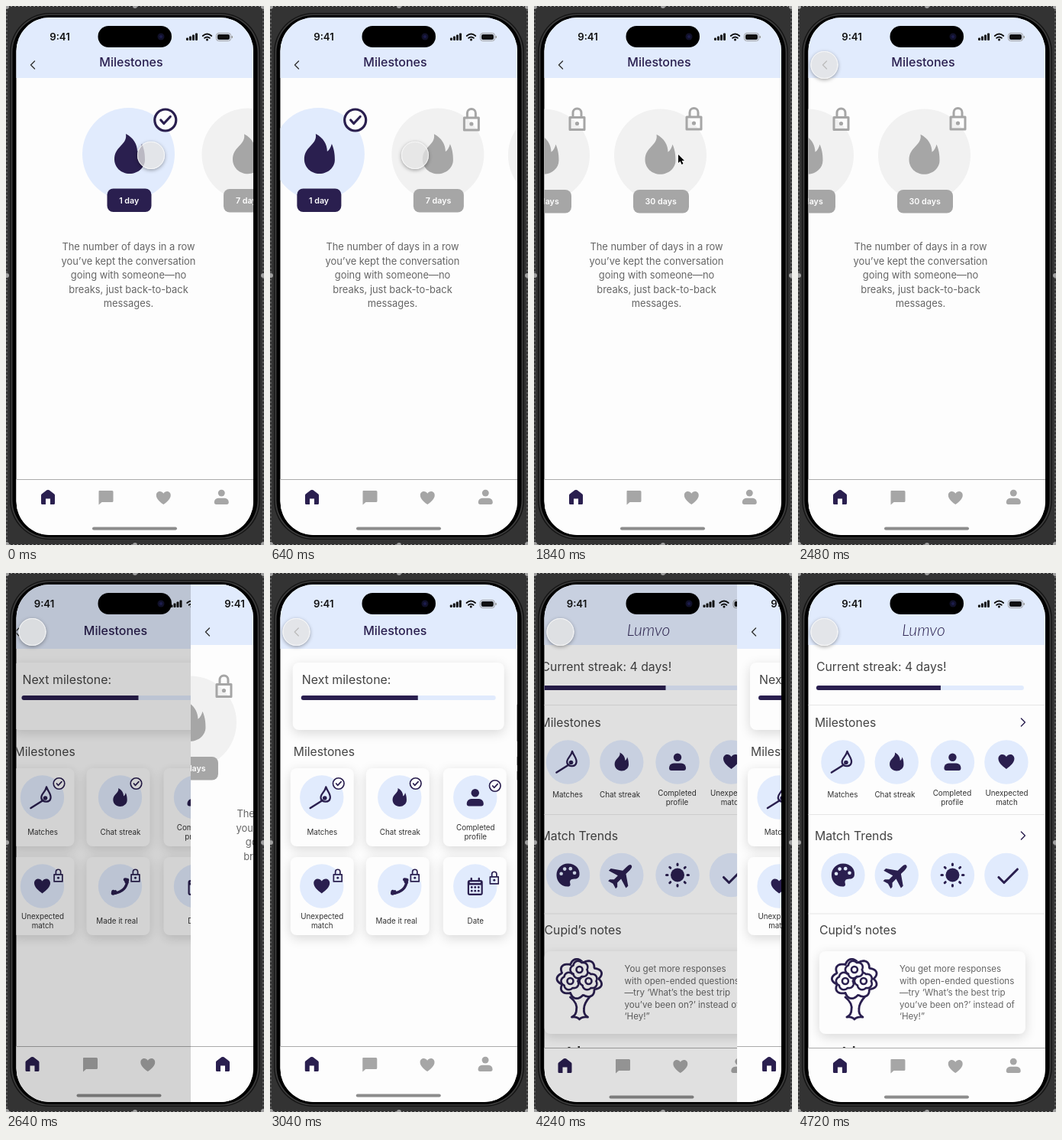
These frames come from a looping animation (338x704 px, 4.8 s). An HTML page with a canvas:

```html
<!DOCTYPE html>
<html lang="en">
<head>
<meta charset="utf-8">
<title>Milestones prototype</title>
<style>
html, body { margin: 0; width: 100%; height: 100%; overflow: hidden; background: #303030; }
canvas { display: block; width: 338px; height: 704px; }
</style>
</head>
<body>
<canvas id="stage"></canvas>
<script>
const W = 338, H = 704, LOOP = 4800, STEP = 80;
const NAVY = '#2a1f4f', BLUE = '#e1ebfd', GREY = '#a6a6a6', PALE = '#f1f1f1', PAPER = '#fdfdfd';
const SCREEN = { x: 13.5, y: 15, w: 310.5, h: 676, r: 44 };
const canvas = document.getElementById('stage');
const ratio = window.devicePixelRatio || 1;
canvas.width = W * ratio;
canvas.height = H * ratio;
const c = canvas.getContext('2d');
c.lineCap = c.lineJoin = 'round';

// ---------- helpers ----------
const clamp = v => Math.max(0, Math.min(1, v));
const smooth = v => { v = clamp(v); return v * v * (3 - 2 * v); };

function at(x, y, scale, draw) {
  c.save();
  c.translate(x, y);
  c.scale(scale, scale);
  draw();
  c.restore();
}
function rect(x, y, w, h, color) {
  c.fillStyle = color;
  c.fillRect(x, y, w, h);
}
function box(x, y, w, h, r, color) {
  c.fillStyle = color;
  c.beginPath();
  c.roundRect(x, y, w, h, r);
  c.fill();
}
function disc(x, y, r, color) {
  c.fillStyle = color;
  c.beginPath();
  c.arc(x, y, r, 0, 7);
  c.fill();
}
function shape(d, color) {
  c.fillStyle = color;
  c.fill(new Path2D(d));
}
function line(d, color, width) {
  c.strokeStyle = color;
  c.lineWidth = width;
  c.stroke(new Path2D(d));
}
function text(s, x, y, size, color, align = 'left', weight = 400) {
  c.font = `${weight} ${size}px Inter, "Open Sans", sans-serif`;
  c.fillStyle = color;
  c.textAlign = align;
  c.fillText(s, x, y);
}
function lines(list, x, y, gap, size, color, align) {
  list.forEach((s, i) => text(s, x, y + i * gap, size, color, align));
}
function panel(x, y, w, h) {
  c.save();
  c.shadowColor = 'rgba(0,0,0,.15)';
  c.shadowBlur = 15 * ratio;
  c.shadowOffsetY = 4 * ratio;
  box(x, y, w, h, 8, PAPER);
  c.restore();
}
function progress(x, y, w, done) {
  box(x, y, w, 6, 3, BLUE);
  box(x, y, done, 6, [3, 0, 0, 3], NAVY);
}

// ---------- icons, each centred on the origin ----------
const flame = color => shape('M-5-26C5-21 10-12 10-3C13-5 15-9 16-13C20-4 20 4 20 8C20 18 11 26 0 26' +
  'C-11 26-20 18-20 7C-20 0-17-5-12-10C-6-16-4-20-5-26Z', color);
const heart = color => shape('M0 9.5C-6 5-10.5 1-10.5-4C-10.5-10-3-11.5 0-6.5C3-11.5 10.5-10 10.5-4C10.5 1 6 5 0 9.5Z', color);

function person(color) {
  disc(0, -5.7, 5.2, color);
  box(-11, 2, 22, 9.5, [6, 6, 3, 3], color);
}
function home(color) {
  shape('M-9-2.5Q-9-3.5-8-4.2L-1.5-9.2Q0-10 1.5-9.2L8-4.2Q9-3.5 9-2.5V8Q9 9.5 7.5 9.5H3V2H-3V9.5H-7.5Q-9 9.5-9 8Z', color);
}
function chat(color) {
  shape('M-9-9H8Q9.5-9 9.5-7.5V4.5Q9.5 6 8 6H-5.5L-9.5 9.5V-7.5Q-9.5-9-9-9Z', color);
}
function match() {
  line('M-15 14L1 4', NAVY, 2.6);
  line('M5.5-13.5C8-7 12-4 11 1C10 7 1 7-1 2C-3-4 4-6 5.5-13.5Z', NAVY, 2.3);
  disc(4, 1, 2.8, NAVY);
}
function phone() {
  line('M9.5-7Q8 7-8 9.5', NAVY, 3.4);
  line('M6.5-8.5L9.5-8M-9 7L-9.5 9.5M8-6L9-5M-6.5 7.5L-6 8.5', NAVY, 4.6);
}
function calendar() {
  box(-10, -8, 20, 20, 3, NAVY);
  rect(-7.8, -1.5, 15.6, 11.2, BLUE);
  rect(-7, -5.6, 14, 1.6, BLUE);
  line('M-5-10V-7M5-10V-7', NAVY, 2.4);
  for (let i = 0; i < 6; i++) disc((i % 3 - 1) * 4.5, i < 3 ? 1.5 : 6.2, 1.4, NAVY);
}
function palette() {
  shape('M0-15C10-15 16-8 15 0C14 7 7 4 4 6C0 9 6 13 1 15C-9 16-15 8-15 0C-15-8-9-15 0-15Z', NAVY);
  for (let i = 0; i < 4; i++) {
    const a = Math.PI * (1.06 + i * 0.28);
    disc(9 * Math.cos(a), 9 * Math.sin(a), 2.3, BLUE);
  }
}
function plane() {
  c.rotate(Math.PI / 4);
  shape('M0-18Q3-18 3-12V-5L16 4V8L3 4V11L7 15V18L0 16L-7 18V15L-3 11V4L-16 8V4L-3-5V-12Q-3-18 0-18Z', NAVY);
}
function sun() {
  disc(0, 0, 9, NAVY);
  for (let i = 0; i < 8; i++) {
    c.rotate(Math.PI / 4);
    line('M0-13V-14.5', NAVY, 3);
  }
}
const tick = () => line('M-10 3L-3 10L14.5-7.5', NAVY, 3.1);

function checkBadge() {
  disc(0, 0, 14, PAPER);
  c.strokeStyle = NAVY;
  c.lineWidth = 3.2;
  c.stroke();
  line('M-6 0L-2 4.5L6.5-4.5', NAVY, 3.2);
}
function lock(color) {
  line('M-9.5-3H9.5V13H-9.5ZM-5.5-3V-9A5.5 5.5 0 0 1 5.5-9V-3', color, 3);
  disc(0, 5, 2.6, color);
}
function chevron(x, y, dir, size, color) {
  line(`M${x - dir * size / 2} ${y - size}L${x + dir * size / 2} ${y}L${x - dir * size / 2} ${y + size}`, color, 1.4);
}
function scallop(x, y, rx, ry, lobes, width) {
  c.beginPath();
  for (let i = 0; i <= 120; i++) {
    const a = i / 120 * Math.PI * 2;
    const k = 0.82 + 0.18 * Math.abs(Math.sin(a * lobes / 2));
    c.lineTo(x + rx * k * Math.cos(a), y + ry * k * Math.sin(a));
  }
  c.strokeStyle = NAVY;
  c.lineWidth = width;
  c.stroke();
}
function bouquet() {
  scallop(74.5, 530, 30, 26, 9, 2.8);
  [[62, 533], [86, 533], [74, 518]].forEach(([x, y]) => {
    disc(x, y, 11, PAPER);
    scallop(x, y, 12, 11.5, 5, 2.6);
    c.beginPath();
    c.arc(x, y, 4, 0, 7);
    c.stroke();
  });
  line('M62 554Q72 562 70 571Q70 577 64 580Q71 579 74 583Q77 579 85 580Q79 577 80 569Q80 562 88 553', NAVY, 2.8);
}

// ---------- shared interface ----------
function statusBar() {
  text('9:41', 70.5, 45, 13.2, '#111', 'center', 600);
  for (let i = 0; i < 4; i++) box(236 + i * 4, 41.5 - i * 2, 3, 3.5 + i * 2, 1, '#111');
  line('M257.8 39Q263.5 33.8 269.2 39M260.2 41.8Q263.5 39 266.8 41.8', '#111', 1.9);
  disc(263.5, 44, 1.5, '#111');
  c.strokeStyle = '#999';
  c.lineWidth = 1;
  c.beginPath();
  c.roundRect(275.5, 35.5, 19, 10, 3);
  c.stroke();
  box(277, 37, 16, 7, 2, '#111');
  rect(295.6, 39, 1.4, 3, '#999');
}
function header(bottom) {
  rect(13, 15, 311, 676, PAPER);
  rect(13, 15, 311, bottom - 15, BLUE);
  statusBar();
}
function navBar(dy) {
  rect(13, 618 + dy, 311, 73, PAPER);
  rect(13, 618 + dy, 311, 1, '#aaa');
  at(55, 641.5 + dy, 1, () => home(NAVY));
  at(131, 642 + dy, 1, () => chat(GREY));
  at(206.3, 642.5 + dy, 0.9, () => heart(GREY));
  at(282.3, 641 + dy, 0.86, () => person(GREY));
  box(113, 680.5 + dy, 111, 4, 2, '#8c8c8c');
}

// ---------- pages ----------
const STREAKS = [
  { x: 160.5, label: '1 day', w: 58, dy: 0 },
  { x: 317, label: '7 days', w: 66, dy: 0.5 },
  { x: 469.5, label: '14 days', w: 71, dy: 1.5 },
  { x: 622.5, label: '30 days', w: 73, dy: 1.5 }
];

function streakPage(scroll) {
  header(94);
  text('Milestones', 164, 79, 16, NAVY, 'center', 500);
  chevron(35, 77, -1, 5, '#333');
  STREAKS.forEach((s, i) => {
    const x = s.x - scroll, color = i ? GREY : NAVY;
    disc(x, 193.5 + s.dy, 60.5, i ? PALE : BLUE);
    at(x + (i ? 0 : 1.5), 193 + s.dy / 2, 1, () => flame(color));
    at(x + (i ? 44 : 48.3), i ? 149.5 - i * 0.5 : 149, 1, i ? () => lock(GREY) : checkBadge);
    box(x - s.w / 2 + 1, 238.5 + s.dy, s.w, 30.5, 8, color);
    text(s.label, x + 0.7, 257.8 + s.dy, 10.7, '#fff', 'center', 600);
  });
  lines(['The number of days in a row', 'you’ve kept the conversation', 'going with someone—no',
    'breaks, just back-to-back', 'messages.'], 160.5, 319, 18.6, 12.9, '#666', 'center');
  navBar(0);
}

const GOALS = [
  { label: ['Matches'], icon: match },
  { label: ['Chat streak'], icon: () => at(0, 0, 0.46, () => flame(NAVY)) },
  { label: ['Completed', 'profile'], icon: () => person(NAVY) },
  { label: ['Unexpected', 'match'], icon: () => heart(NAVY) },
  { label: ['Made it real'], icon: phone },
  { label: ['Date'], icon: calendar }
];

function goalLabel(goal, x, y) {
  const double = goal.label.length > 1;
  lines(goal.label, x, y - (double ? 6 : 0), 12, 9.8, '#333', 'center');
}

function milestonesPage() {
  header(99);
  text('Milestones', 164, 81, 16, NAVY, 'center', 500);
  chevron(35, 77, -1, 5, '#333');
  panel(30, 117, 277, 88);
  text('Next milestone:', 42, 145, 15.9, '#444');
  progress(41, 160, 255, 153);
  text('Milestones', 31, 239, 15.7, '#444');
  GOALS.forEach((goal, i) => {
    const col = i % 3, row = Math.floor(i / 3);
    const x = [68, 170, 269][col], y = 293 + row * 116;
    panel([27, 126, 227][col], 255 + row * 116, 83, 102);
    disc(x, y, 28.7, BLUE);
    at(x, y, 1, goal.icon);
    const bx = x + [22, 21, 26][col] - row, by = y + (col === 2 ? 3 : 0);
    if (row) at(bx, by - 13.5, 0.57, () => lock(NAVY));
    else at(bx, by - 18, 0.52, checkBadge);
    goalLabel(goal, i === 4 ? 166 : x + 0.5, y + 49);
  });
  navBar(0);
}

function homePage() {
  header(94);
  c.font = 'italic 300 21px Lato, cursive';
  c.fillStyle = NAVY;
  c.textAlign = 'center';
  c.fillText('Lumvo', 164.5, 82);
  text('Current streak: 4 days!', 24, 128, 15.8, '#444');
  progress(24, 147, 272, 163);
  text('Milestones', 22, 201, 15.7, '#444');
  text('Match Trends', 22, 348.5, 15.8, '#444');
  text('Cupid’s notes', 28, 472, 15.8, '#444');
  [172, 315, 444.5].forEach(y => rect(13, y, 311, 1, '#e6e6e6'));
  chevron(295, 195, 1, 5, NAVY);
  chevron(295, 343, 1, 5, NAVY);
  const trends = [palette, plane, sun, tick];
  [59, 129.3, 202.5, 273].forEach((x, i) => {
    disc(x, 247, 28.7, BLUE);
    at(x, 246.5, 1, GOALS[i].icon);
    goalLabel(GOALS[i], i === 1 ? 127 : x - 0.5 + (i === 3 ? 1 : 0), 296.7 - (i < 2 ? 3.7 : 0));
    disc(x, 394.5, 28.7, BLUE);
    at(x, 394.5, 1, trends[i]);
  });
  panel(28, 494, 270, 108);
  bouquet();
  lines(['You get more responses', 'with open-ended questions', '—try ‘What’s the best trip',
    'you’ve been on?’ instead of', '‘Hey!”'], 133, 521.3, 15.4, 11.6, '#666');
  rect(59, 619, 3, 2, '#333');
  rect(72, 618, 2.5, 2, '#333');
  navBar(2);
}

// ---------- phone and pointer ----------
function device() {
  rect(0, 0, W, H, '#333');
  box(5, 9, 328, 688, 52, '#151515');
  box(6.5, 10.5, 325, 685, 50.5, '#3c3c3c');
  box(8.5, 12, 321, 682, 48.5, '#000');
  c.save();
  c.setLineDash([2, 3]);
  c.lineCap = 'butt';
  c.lineWidth = 1;
  c.strokeStyle = '#999';
  c.strokeRect(1, 0.5, 336, 703);
  c.restore();
  [[1, 1], [169, 0], [337, 1], [1, 352], [337, 352], [1, 703], [169, 704], [337, 703]]
    .forEach(([x, y]) => disc(x, y, 3, '#a0a0a0'));
}
function island() {
  box(120.5, 26, 96.5, 28, 14, '#000');
  disc(203, 40, 4.5, '#11112a');
  disc(203, 40, 2, '#1d1d4c');
}
function touch(x, y, alpha) {
  c.save();
  c.globalAlpha = alpha;
  // The shadow stays outside the see-through disc.
  c.save();
  c.beginPath();
  c.rect(0, 0, W, H);
  c.arc(x, y, 18, 0, 7);
  c.clip('evenodd');
  c.shadowColor = 'rgba(0,0,0,.35)';
  c.shadowBlur = 5 * ratio;
  c.shadowOffsetY = 1.5 * ratio;
  disc(x, y, 18, '#fff');
  c.restore();
  disc(x, y, 18, 'rgba(228,228,228,.78)');
  c.strokeStyle = 'rgba(255,255,255,.7)';
  c.lineWidth = 1;
  c.beginPath();
  c.arc(x, y, 17.5, 0, 7);
  c.stroke();
  c.restore();
}
function arrow(x, y) {
  at(x, y, 1, () => {
    const d = 'M0 0V11L2.6 8.7L4.5 13L6.5 12.1L4.6 8H8Z';
    line(d, '#fff', 1.6);
    shape(d, '#000');
  });
}

// ---------- motion ----------
const SCROLL = [[0, 0, 0], [560, 69, 0.3], [1040, 291, 0.45], [1440, 457, 0]];

// Cubic Hermite through [time, position, speed] points.
function scrollAt(t) {
  if (t >= 1440) return 457;
  const i = SCROLL.findIndex(k => k[0] > t);
  const [t0, p0, v0] = SCROLL[i - 1], [t1, p1, v1] = SCROLL[i];
  const d = t1 - t0, u = (t - t0) / d, w = 1 - u;
  return p0 * (1 + 2 * u) * w * w + v0 * d * u * w * w + p1 * u * u * (3 - 2 * u) - v1 * d * u * u * w;
}
const slideAt = (t, start) => t < start ? 0 : 1 - Math.exp(-(t - start) * 0.0112);

function slideBack(p, outgoing, incoming) {
  const offset = 311 * p, rest = 1 - p;
  at(-311 * 0.25 * rest, 0, 1, incoming);
  rect(13, 15, 311, 676, `rgba(0,0,0,${0.62 * rest})`);
  if (p > 0.998) return;
  at(offset, 0, 1, () => {
    c.beginPath();
    c.rect(13, 15, 311, 676);
    c.clip();
    outgoing();
  });
}
function pointer(t) {
  if (t < 1840) touch(190, 195, 1);
  else if (t < 2400) {
    const u = smooth((t - 1840) / 480);
    arrow(189 - 155 * u, 194 - 116 * u);
  } else if (t < 3360) touch(34.5, 77, clamp((t - 2340) / 120));
  else if (t < 4080) arrow(34, 78);
  else touch(34.5, 77, clamp((t - 4020) / 120));
}
function render(t) {
  c.setTransform(ratio, 0, 0, ratio, 0, 0);
  device();
  c.save();
  c.beginPath();
  c.roundRect(SCREEN.x, SCREEN.y, SCREEN.w, SCREEN.h, SCREEN.r);
  c.clip();
  const first = slideAt(t, 2521), second = slideAt(t, 4090);
  if (second) slideBack(second, milestonesPage, homePage);
  else if (first) slideBack(first, () => streakPage(457), milestonesPage);
  else streakPage(scrollAt(t));
  c.restore();
  island();
  pointer(t);
}

const began = performance.now();
function play() {
  const t = (performance.now() - began) % LOOP;
  render(Math.floor(t / STEP) * STEP);
  requestAnimationFrame(play);
}
play();
</script>
</body>
</html>
```
